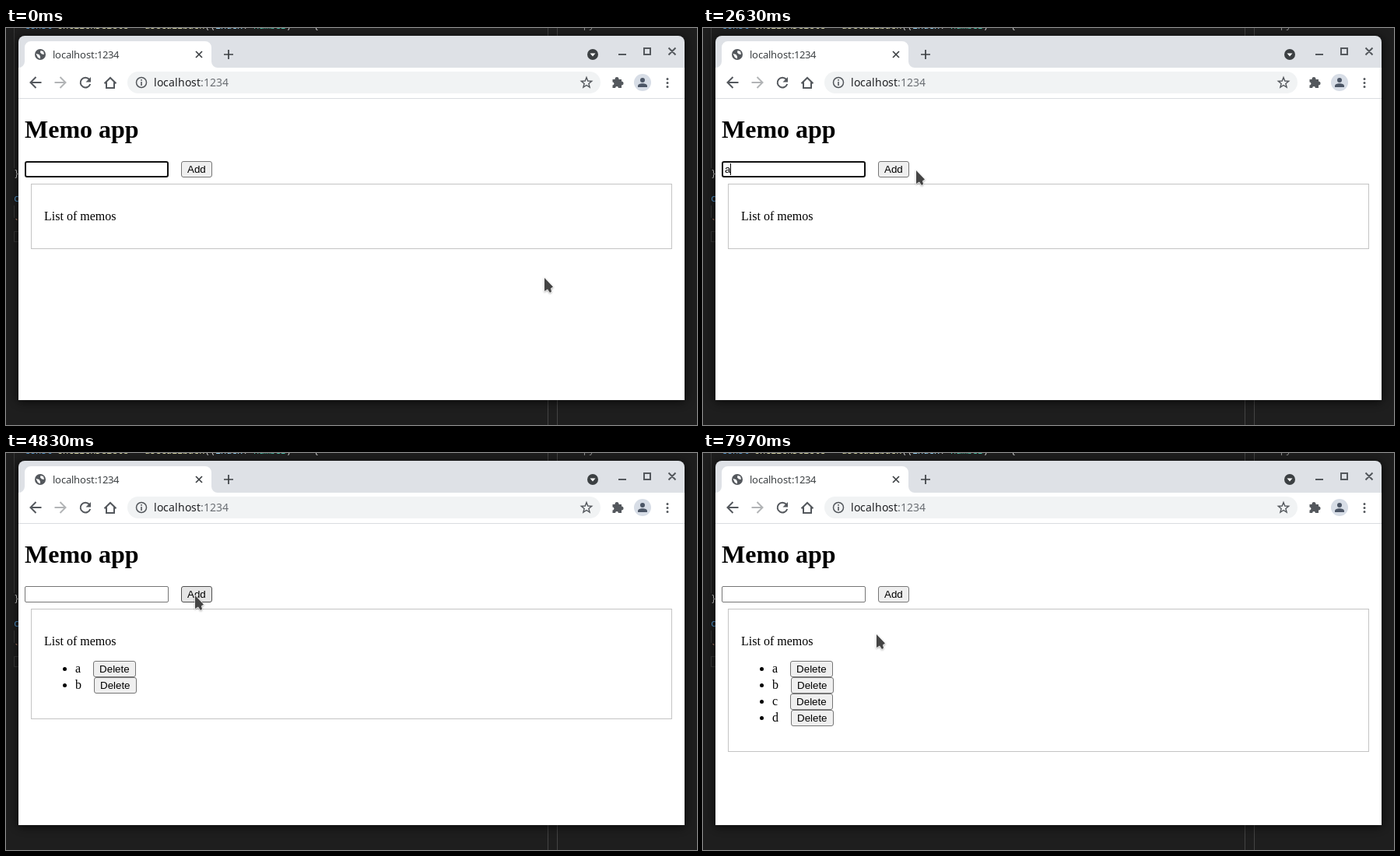
An HTML page that plays this animation: 888 px wide and 510 px high, repeating every 8000 ms.

```html
<!DOCTYPE html>
<html lang="en">
<head>
<meta charset="utf-8">
<title>Memo app</title>
<style>
html, body { margin: 0; width: 100%; height: 100%; overflow: hidden; background: #1e1e1e; }
svg, #page, #field, #add, #list { position: absolute; }
svg { left: 0; top: 0; }
.code { font: 12px "Noto Sans Mono", monospace; }
.ui { font-family: "Noto Sans", sans-serif; }
.line { fill: none; stroke: #54585d; stroke-width: 2; }
#page { left: 16px; top: 91px; width: 856px; height: 387px; overflow: hidden; background: #fff;
  color: #000; font: 16px "Liberation Serif", serif; }
h1 { margin: 21.44px 8px 0; font-size: 32px; }
button, #field { box-sizing: border-box; height: 21px; font: 13.333px/15px "Liberation Sans", sans-serif; color: #000; }
button { margin: 0 0 0 16px; padding: 2px 7px; border: 1px solid #767676; border-radius: 3px; background: #efefef; }
button.hover { background: #e5e5e5; border-color: #4f4f4f; }
#add { left: 193px; top: 80px; }
#field { left: 8px; top: 80px; width: 185px; padding: 2px 3px; border: 1px solid #767676; border-radius: 2px; }
#field.focus { padding: 1px 2px; border: 2px solid #101010; border-radius: 3px; }
#caret { display: inline-block; width: 1px; height: 15px; background: #000; vertical-align: top; }
#list { box-sizing: border-box; left: 16px; top: 109px; width: 824px; padding: 16px; border: 1px solid #c4c4c4; }
p, ul { margin: 16px 0; }
ul { padding-left: 40px; }
</style>
</head>
<body>
<svg width="888" height="510">
  <filter id="shadow" x="-10%" y="-10%" width="120%" height="120%"><feGaussianBlur stdDeviation="6"/></filter>
  <g class="code" fill="#d4d4d4">
    <text x="24" y="1"><tspan fill="#569cd6">const</tspan> <tspan fill="#dcdcaa">onClickDelete</tspan> = <tspan fill="#dcdcaa">useCallback</tspan>((<tspan fill="#9cdcfe">index</tspan>: <tspan fill="#4ec9b0">number</tspan>) =&gt; {</text>
    <text x="728" y="0" fill="#8a8a8a">copy</text>
    <text x="10" y="191">}</text>
    <text x="10" y="223" fill="#569cd6">c</text>
    <text x="10" y="255" fill="#ce9178">`</text>
  </g>
  <path d="M10.5 0V180M10.5 228V244M17 261.5H10.5V274.5H17" fill="none" stroke="#383838"/>
  <path d="M696.5 0V510M708.5 0V510" stroke="#444"/>

  <!-- window, tab and address bar -->
  <rect x="14" y="11" width="860" height="470" rx="8" opacity=".6" filter="url(#shadow)"/>
  <rect x="16" y="10" width="856" height="60" rx="8" fill="#dee1e6"/>
  <path d="M16 51a8 8 0 0 0 8-8V25a8 8 0 0 1 8-8H256a8 8 0 0 1 8 8V43a8 8 0 0 0 8 8H872V91H16z" fill="#fff"/>
  <path d="M16 90.5H872" stroke="#dadce0"/>
  <rect x="156" y="56" width="608" height="28" rx="14" fill="#f1f3f4"/>
  <g class="ui">
    <text x="60" y="39" font-size="13" fill="#3c4043">localhost:1234</text>
    <text x="190" y="75" font-size="14" fill="#202124">localhost<tspan fill="#6b6f74">:1234</tspan></text>
  </g>

  <!-- toolbar icons -->
  <g class="line">
    <path id="back" d="M45.5 70H32M38.5 63l-7 7 7 7"/>
    <use href="#back" transform="matrix(-1 0 0 1 108 0)" opacity=".45"/>
    <path d="M107 66A6.4 6.4 0 1 0 108.2 72"/>
    <path d="M126.5 71.2L134 64l7.5 7.2M129 69.5V77H139V69.5"/>
    <circle cx="174" cy="70" r="6.5" stroke-width="1.5"/>
    <path d="M174 69V74M174 66V67.7" stroke-width="1.6"/>
    <path id="star" stroke-width="1.4"/>
    <path d="M850 65.5h.01m0 5h.01m0 5h.01" stroke-width="3" stroke-linecap="round"/>
    <path d="M787 34H797M820 26H828V34H820zM851.5 25.5l9 9m0-9l-9 9"/>
    <path d="M280 34H292M286 28V40M244 30l8 8m0-8l-8 8" stroke="#3c4043" stroke-width="1.7"/>
  </g>
  <g fill="#54585d">
    <path d="M109 63v6.500h-6.500z"/>
    <path d="M779.500 66H791V77H779.500z"/>
    <circle cx="785" cy="65.500" r="2.500"/><circle cx="791" cy="71" r="2.500"/>
    <circle cx="44" cy="34" r="7"/>
  </g>
  <g fill="#fff">
    <circle cx="779.500" cy="71.500" r="1.900"/><circle cx="785" cy="77" r="1.900"/>
    <path d="M38.500 33l4 1 1.500 2.500v3l-3-1.500zM44.500 29l3.500 1 1 4-3-.5-2-2z"/>
  </g>
  <circle cx="754" cy="34" r="7" fill="#3c4043"/>
  <path d="M750.500 32.500h7l-3.500 4z" fill="#fff"/>
  <circle cx="818" cy="70" r="11" fill="#d7dde6"/>
  <circle cx="818" cy="67" r="3" fill="#4c5666"/>
  <path d="M812 76v-1.500c0-4.400 12-4.400 12 0V76z" fill="#4c5666"/>
</svg>

<div id="page">
  <h1>Memo app</h1>
  <div id="field"><span id="typed"></span><i id="caret"></i></div>
  <button id="add" tabindex="-1">Add</button>
  <div id="list"><p>List of memos</p><ul id="items"></ul></div>
</div>

<svg width="888" height="510">
  <g id="pointer">
    <path id="arrow" d="M0 0V17L4 14.500 7 19 9 17.500 8 13.500 11 11.500z" fill="#444" stroke="#fff" stroke-width="1.200" paint-order="stroke" style="filter:drop-shadow(0 1px 1px #0005)"/>
    <path id="beam" d="M-3-7H2M-.5-7V7M-3 7H2" fill="none" stroke="#555"/>
  </g>
</svg>

<script>
const $ = id => document.getElementById(id);

// Place glyphs on whole pixels, as hinted text does
const pen = document.createElement("canvas").getContext("2d");
for (const text of document.querySelectorAll("text")) {
  const { fontSize, fontFamily } = getComputedStyle(text);
  pen.font = `${fontSize} ${fontFamily}`;
  let x = +text.getAttribute("x");
  const starts = [...text.textContent].map(c => {
    const start = x;
    x += Math.round(pen.measureText(c).width);
    return start;
  });
  text.setAttribute("x", starts.join(" "));
}

const corners = Array.from({ length: 10 }, (_, i) => {
  const r = i % 2 ? 3 : 7, a = i * Math.PI / 5;
  return `${746 + r * Math.sin(a)} ${70.5 - r * Math.cos(a)}`;
});
$("star").setAttribute("d", `M${corners.join("L")}z`);

// Each memo: move to the field, focus it, type, pause on the way out, press Add
const memos = [
  { name: "a", move: 1630, focus: 1670, restX: 184, type: 2400, pauseX: 274, press: 2870 },
  { name: "b", move: 3030, focus: 3430, restX: 178, type: 4270, pauseX: 243, press: 4730 },
  { name: "c", move: 4970, focus: 5000, restX: 190, type: 5930, pauseX: 243, press: 6230 },
  { name: "d", move: 6470, focus: 6700, restX: 153, type: 7030, pauseX: 222, press: 7450 }
];
const addDelay = 100;

// Pointer legs: start, duration, end x, end y
const legs = [
  [1170, 460, 205, 195],
  ...memos.flatMap(m => [
    [m.move, 240, m.restX, 180],
    [m.type, 200, m.pauseX, 183],
    [m.press - 100, 100, 243, 183]
  ]),
  [7870, 100, 223, 233]
];

function pointerAt(t) {
  let x = 692, y = 321;
  for (const [start, time, endX, endY] of legs) {
    const p = Math.min(1, Math.max(0, (t - start) / time));
    const k = p * (2 - p);
    x += (endX - x) * k;
    y += (endY - y) * k;
  }
  return [Math.round(x), Math.round(y)];
}

let shown = -1;
function draw(now) {
  const t = now % 8000;
  const [x, y] = pointerAt(t);
  const inRow = y >= 171 && y < 192;
  const overField = inRow && x >= 24 && x < 209;
  $("pointer").setAttribute("transform", `translate(${x} ${y})`);
  $("arrow").style.display = overField ? "none" : "";
  $("beam").style.display = overField ? "" : "none";
  $("add").className = inRow && x >= 225 && x < 265 ? "hover" : "";

  // The field is already focused when the loop begins
  const current = memos.find(m => t >= m.focus && t < m.press);
  const typing = memos.find(m => t >= m.type && t < m.press + addDelay);
  const focused = current || t < legs[0][0];
  const blinkStart = typing ? typing.type : current ? current.focus : -770;
  const caret = focused && (t - blinkStart) % 1000 < 500;
  $("field").className = focused ? "focus" : "";
  $("caret").style.visibility = caret ? "visible" : "hidden";
  $("typed").textContent = typing ? typing.name : "";

  const added = memos.filter(m => t >= m.press + addDelay);
  if (added.length !== shown) {
    shown = added.length;
    $("items").innerHTML = added.map(m => `<li>${m.name}<button tabindex="-1">Delete</button></li>`).join("");
  }
  requestAnimationFrame(draw);
}
draw(0);
</script>
</body>
</html>
```
